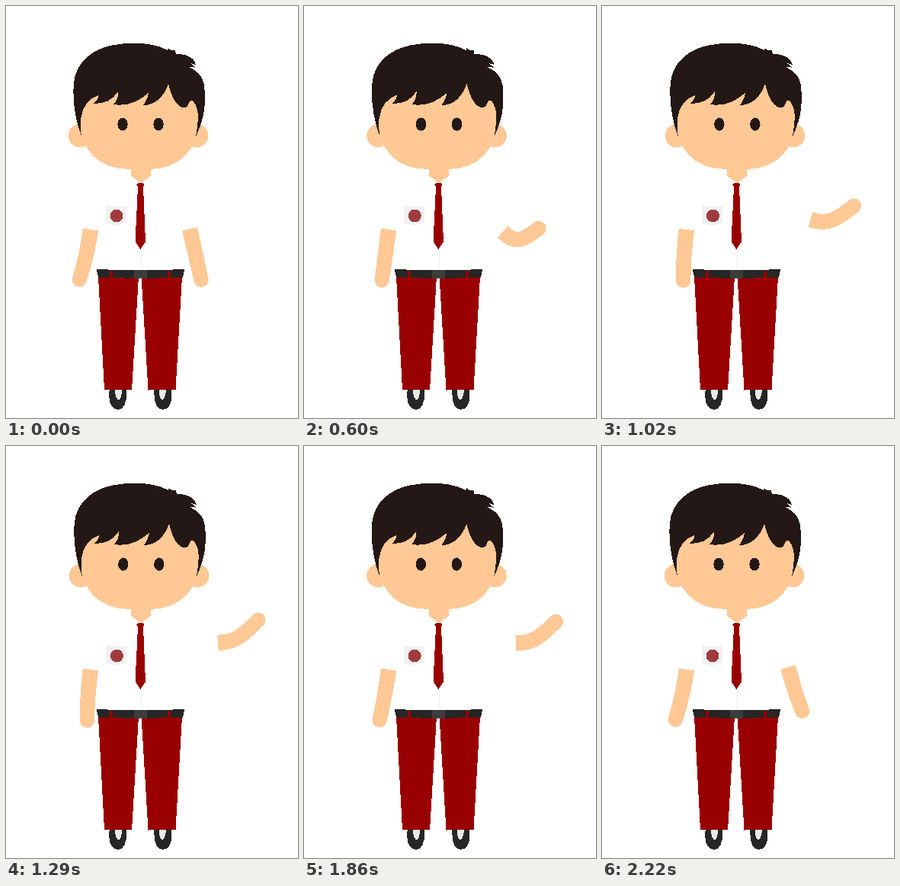
Write an HTML page that moves like this. It is 383 by 540 pixels and loops after 2250 ms.

```html
<!DOCTYPE html>
<html lang="en">
<head>
<meta charset="utf-8">
<title>Schoolboy waving</title>
<style>
  html, body { margin: 0; width: 100%; height: 100%; overflow: hidden; background: #fff; }
  svg { display: block; width: 383px; height: 540px; shape-rendering: crispEdges; }
  .skin { fill: #ffc895; }
  .hair { fill: #231815; }
  .red { fill: #990000; }
  .dark { fill: #262626; }
</style>
</head>
<body>
<svg viewBox="0 0 383 540">
  <defs>
    <g id="shoe">
      <path class="dark" d="M136 502H158C159 517 156 529 147 529C138 529 133 518 136 502Z"/>
      <path fill="#e9e9e9" d="M142.500 502H152C152 510 150.500 516 147.500 516C145 516 143 510 142.500 502Z"/>
    </g>
  </defs>

  <use href="#shoe"/>
  <use href="#shoe" transform="matrix(-1 0 0 1 352.500 0)"/>
  <path class="red" d="M121 354H174L165 503.500L129 503Z M177.500 354H231L222.500 503L186.500 503.500Z"/>
  <path class="dark" d="M118.500 345Q176 347.500 234 345L232 355.500Q176 358 121 355.500Z"/>
  <path class="red" d="M135.500 347H139.500L140.500 357H136.500Z M212.500 347H216.500L215.500 357H211.500Z"/>
  <path fill="#3c3c3c" d="M168 346H184.500V357H168Z"/>

  <path id="left" class="skin"/>
  <path id="right" class="skin"/>

  <path fill="#eee" d="M177 318H178V345H177Z"/>
  <path class="skin" d="M164 208H190V221L191 222L177 232L163 222L164 221Z"/>
  <path class="red" d="M171 234.500L174 232H179.500L181.500 234.500L180 237L183 309L176.500 319L169.500 309L173 237Z"/>
  <g id="pocket">
    <path fill="#f1f1f1" d="M131 261Q145 264 158 262V284L145 288L131 285Z"/>
    <circle cx="145" cy="275" r="8.500" fill="#a03b3d"/>
  </g>

  <g id="head">
    <circle class="skin" cx="97" cy="170" r="15.200"/>
    <circle class="skin" cx="250.200" cy="170" r="15.200"/>
    <path class="skin" d="M96 130C92 185 117 214 163 214H188C230 214 258 185 254 130L215 90H130Z"/>
    <path class="hair" d="M99 171C90 148 87 120 89 101C91 73 115 56 139 51.500
      C160 47.500 192 46.500 212 58L213 55Q216 59 222 58L223 63Q236 63 241 67
      Q247 70 249 77L242 75L249 81Q241 79 240 80C252 86 258 92 260 104
      C263 132 259 150 249 171Q254 143 250 133Q246 122 242 124
      C239 126 240 132 235 133C225 134 218 122 213 102
      C207 119 196 130 180 130Q186 122 187 114C174 124 163 132 141 129
      Q148 121 147 112C139 124 130 128 115 128Q122 121 121 117
      C109 121 100 131 98 148Q97 158 99 171Z"/>
    <ellipse class="hair" cx="153" cy="155" rx="6.700" ry="8.600"/>
    <ellipse class="hair" cx="200" cy="155" rx="6.700" ry="8.600"/>
  </g>
</svg>
<script>
  const LOOP = 2250, STEP = 30;
  const $ = id => document.getElementById(id);
  const mix = (a, b, k) => a + (b - a) * k;

  // Each pose: cuff, elbow, hand
  const REST = [[241, 292.5], [248.5, 325], [256, 359]];
  const LOW = [[273.5, 280], [298.4, 287], [330.5, 262]];
  const HIGH = [[278, 258], [303, 256], [331, 228]];

  // The arm rises, holds, lifts, dips and drops; sag pulls each joint down midway
  const MOVES = [
    { end: 860, from: REST, to: LOW, sag: [15, 18, 0] },
    { end: 1020, from: LOW, to: LOW },
    { end: 1290, from: LOW, to: HIGH },
    { end: 1910, from: HIGH, to: HIGH, sag: [2, 6, 8] },
    { end: LOOP, from: HIGH, to: REST, sag: [2, 8, 0] }
  ];

  function pose(t) {
    const i = MOVES.findIndex(m => t < m.end);
    const { end, from, to, sag = [0, 0, 0] } = MOVES[i];
    const start = i ? MOVES[i - 1].end : 0;
    const k = (t - start) / (end - start);
    return from.map(([x, y], n) => {
      const drop = sag[n] * Math.sin(Math.PI * k);
      return [mix(x, to[n][0], k) - drop / 4, mix(y, to[n][1], k) + drop];
    });
  }

  // Cubic through a softened elbow: value and slope
  function bend(a, e, b, u) {
    const v = 1 - u, p = mix(a, e, 0.85), q = mix(b, e, 0.85);
    return [
      v ** 3 * a + 3 * v * v * u * p + 3 * v * u * u * q + u ** 3 * b,
      v * v * (p - a) + 2 * v * u * (q - p) + u * u * (b - q)
    ];
  }

  // Tapered limb: flat at the cuff, round at the hand
  function limb([cuff, elbow, hand]) {
    const N = 16, R0 = 10.2, R1 = 9.6, one = [], two = [];
    for (let i = 0; i <= N; i++) {
      const u = i / N;
      const [[x, dx], [y, dy]] = [0, 1].map(n => bend(cuff[n], elbow[n], hand[n], u));
      const s = mix(R0, R1, u) / Math.hypot(dx, dy);
      one.push([x - dy * s, y + dx * s]);
      two.unshift([x + dy * s, y - dx * s]);
    }
    return `M${one.join('L')}A${R1} ${R1} 0 0 0 ${two.join('L')}Z`;
  }

  function draw(now) {
    const t = Math.floor(now % LOOP / STEP) * STEP;
    const sway = (1 - Math.cos(2 * Math.PI * t / LOOP)) / 2;
    $('right').setAttribute('d', limb(pose(t)));
    $('left').setAttribute('d',
      limb([[111, 293], [105.5 + 1.5 * sway, 328], [96.3 + 10.7 * sway, 358.7 + 1.3 * sway]]));
    $('pocket').setAttribute('transform', `translate(${0.5 * sway} 0)`);
    $('head').setAttribute('transform', `translate(${0.9 * sway} 0)`);
    requestAnimationFrame(draw);
  }

  draw(0);
</script>
</body>
</html>
```
